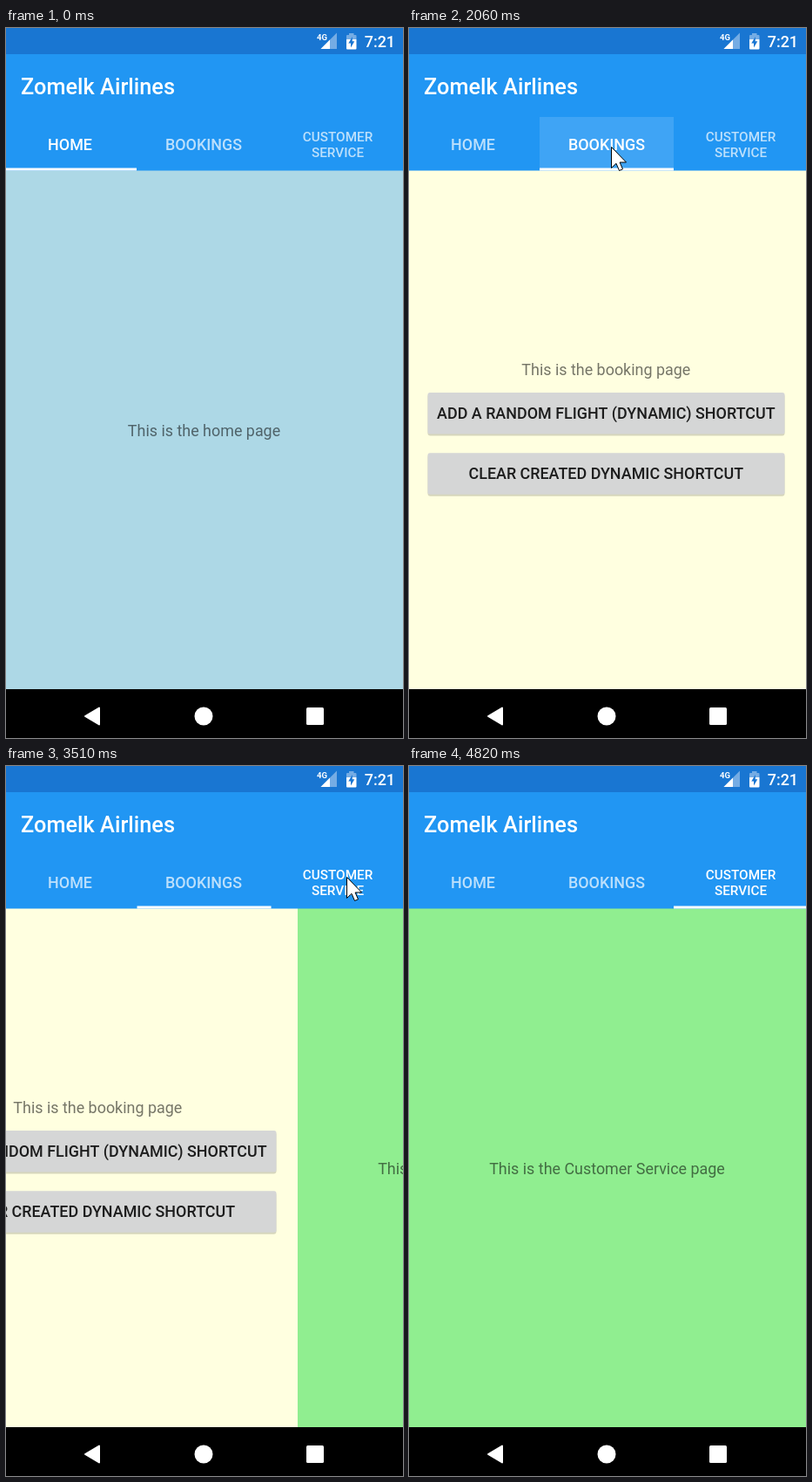
These frames come from a looping animation (456x814 px, 5.28 s). An HTML page with a canvas:

```html
<!DOCTYPE html>
<html lang="en">
<head>
<meta charset="utf-8">
<title>Tab navigation</title>
<style>
html, body { margin: 0; width: 100%; height: 100%; overflow: hidden; background: #000; }
canvas { display: block; }
</style>
</head>
<body>
<canvas id="stage" width="456" height="814"></canvas>
<script>
const ctx = document.getElementById('stage').getContext('2d');
const WIDTH = 456, HEIGHT = 814, LOOP = 5280;
const BAR_BOTTOM = 163.5, NAV_TOP = 758;
const BODY = 17.92, SMALL = 15.3;
const INK = 'rgba(0,0,0,.54)';

const REFRESH = 47; // the screen is redrawn in steps of this many ms
const ENTER = 330;
const LEAD = 12;    // the page is already moving at the first redraw after a tap

const TABS = [
  { x: 0, w: 150, mid: 73.5, lines: ['HOME'] },
  { x: 150, w: 154, mid: 227, lines: ['BOOKINGS'] },
  { x: 304, w: 152, mid: 381, lines: ['CUSTOMER', 'SERVICE'] }
];
const TAPS = [
  { at: 1750, tab: 1, x: 232, y: 136 },
  { at: 3510, tab: 2, x: 391, y: 127 }
];

// Each glide of the pointer is one bend from where it rests to the next place.
const [BOOK, HELP] = TAPS;
const GLIDES = [
  { start: ENTER, end: 830, from: { x: 378, y: 739 }, bend: { x: 33, y: 193 }, to: { x: 208, y: 199 } },
  { start: 830, end: 1470, from: { x: 208, y: 199 }, bend: { x: 228, y: 145 }, to: BOOK },
  { start: 2250, end: 3140, from: BOOK, bend: { x: 217, y: 327 }, to: HELP },
  { start: 3800, end: 4775, from: HELP, bend: { x: 417, y: 260 }, to: { x: 391, y: HEIGHT } }
];

const clamp = v => Math.max(0, Math.min(1, v));
const mix = (a, b, k) => a + (b - a) * k;
const bendAt = (a, b, c, k) => mix(mix(a, b, k), mix(b, c, k), k);
const decelerate = k => 1 - (1 - clamp(k)) ** 5;

// cubic-bezier(.4, 0, .2, 1)
function standardEase(k) {
  k = clamp(k);
  let lo = 0, hi = 1;
  for (let i = 0; i < 20; i++) {
    const s = (lo + hi) / 2;
    const x = 1.2 * s * (1 - s) ** 2 + .6 * s * s * (1 - s) + s ** 3;
    if (x < k) lo = s; else hi = s;
  }
  return 3 * lo * lo - 2 * lo ** 3;
}

// Redraws are counted from the latest moment the user did something.
function snap(t) {
  const since = [0, ENTER, BOOK.at, HELP.at].filter(at => at <= t).pop();
  return since + Math.floor((t - since) / REFRESH) * REFRESH;
}

function rect(x, y, w, h, color, r = 0) {
  ctx.fillStyle = color;
  ctx.beginPath();
  ctx.roundRect(x, y, w, h, r);
  ctx.fill();
}

function poly(points, color) {
  ctx.fillStyle = color;
  ctx.beginPath();
  points.forEach(([x, y]) => ctx.lineTo(x, y));
  ctx.closePath();
  ctx.fill();
}

function circle(x, y, r, color) {
  ctx.fillStyle = color;
  ctx.beginPath();
  ctx.arc(x, y, r, 0, Math.PI * 2);
  ctx.fill();
}

function outline(color, width, join) {
  ctx.strokeStyle = color;
  ctx.lineWidth = width;
  ctx.lineJoin = join;
  ctx.stroke();
}

function text(str, x, y, size, color, weight = 400, align = 'center') {
  ctx.font = `${weight} ${size}px Roboto, sans-serif`;
  ctx.textAlign = align;
  ctx.fillStyle = color;
  ctx.fillText(str, x, y);
}

function button(label, y) {
  rect(21.5, y + 1.5, 410, 48, 'rgba(0,0,0,.16)', 3);
  rect(21.5, y, 410, 47.5, '#d5d6d6', 2.5);
  text(label, 226.3, y + 30, BODY, 'rgba(0,0,0,.87)', 500);
}

const PAGES = [
  { color: '#add8e6', draw: () => text('This is the home page', 227.5, 467.5, BODY, INK) },
  { color: '#ffffe0', draw() {
    text('This is the booking page', 226.3, 398, BODY, INK);
    button('ADD A RANDOM FLIGHT (DYNAMIC) SHORTCUT', 418);
    button('CLEAR CREATED DYNAMIC SHORTCUT', 487.3);
  } },
  { color: '#90ee90', draw: () => text('This is the Customer Service page', 227.5, 467.5, BODY, INK) }
];

function drawPages(scroll) {
  PAGES.forEach((page, i) => {
    const x = Math.round((i - scroll) * WIDTH);
    if (Math.abs(x) >= WIDTH) return;
    ctx.save();
    ctx.translate(x, 0);
    rect(0, 163, WIDTH, NAV_TOP - 163, page.color);
    page.draw();
    ctx.restore();
  });
}

function drawStatus() {
  const faint = 'rgba(255,255,255,.4)';
  rect(0, 0, WIDTH, 30, '#1976d2');
  text('4G', 357, 13.5, 9.5, '#fff', 700, 'left');
  poly([[361.5, 24], [380, 24], [380, 5.5]], faint);
  poly([[361.5, 24], [372, 24], [372, 13.5]], '#fff');
  rect(394, 6, 5.5, 2, faint);
  rect(391, 8, 11.5, 5, faint, [1, 1, 0, 0]);
  rect(391, 13, 11.5, 11.5, '#fff', [0, 0, 1, 1]);
  poly([[397.8, 10], [393.3, 17.5], [396, 17.5], [396, 22.5], [400.3, 15.2], [397.8, 15.2]], '#1976d2');
  text('7:21', 447, 22, BODY, '#fff', 500, 'right');
}

function drawRipple(t, tap) {
  const age = t - tap.at;
  const strength = Math.min(clamp(age / 90), clamp((580 - age) / 220));
  if (strength <= 0) return;
  const tab = TABS[tap.tab];
  ctx.save();
  ctx.beginPath();
  ctx.rect(tab.x, 102, tab.w, BAR_BOTTOM - 102);
  ctx.clip();
  circle(tap.x, tap.y, mix(20, 190, clamp(age / 240)), `rgba(255,255,255,${.135 * strength})`);
  ctx.restore();
}

function drawAppBar(t, selected) {
  rect(0, 30, WIDTH, BAR_BOTTOM - 30, '#2196f3');
  text('Zomelk Airlines', 17, 76, 25.33, '#fff', 500, 'left');
  TAPS.forEach(tap => drawRipple(t, tap));
  TABS.forEach(({ mid, lines }, i) => {
    const color = i === selected ? '#fff' : 'rgba(255,255,255,.7)';
    if (lines.length === 1) text(lines[0], mid, 139.5, BODY, color, 500);
    else lines.forEach((line, n) => text(line, mid, 130 + n * 18, SMALL, color, 500));
  });
  let { x, w } = TABS[0];
  for (const tap of TAPS) {
    if (t < tap.at) break;
    const k = standardEase((t - tap.at + LEAD) / 300), to = TABS[tap.tab];
    x = mix(x, to.x, k);
    w = mix(w, to.w, k);
  }
  rect(x, 160.5, w, 3, '#fff');
}

function drawNav() {
  rect(0, NAV_TOP, WIDTH, HEIGHT - NAV_TOP, '#000');
  poly([[91, 789], [107, 779.5], [107, 798.5]], '#fff');
  outline('#fff', 2, 'round');
  circle(227, 789, 10.5, '#fff');
  rect(345, 779, 20, 20, '#fff', 1.5);
}

function drawPointer(t) {
  const glide = GLIDES.filter(g => g.start <= t).pop();
  if (!glide || t >= GLIDES.at(-1).end) return;
  const { start, end, from, bend, to } = glide;
  const k = clamp((t - start) / (end - start));
  const [x, y] = ['x', 'y'].map(axis => Math.round(bendAt(from[axis], bend[axis], to[axis], k)));
  ctx.save();
  ctx.translate(x + .5, y + .5);
  poly([[0, 0], [0, 24], [5.5, 18.8], [9, 27], [13, 25.3], [9.6, 17.5], [17, 17.5]], '#fff');
  outline('#000', 1, 'miter');
  ctx.restore();
}

function render(now) {
  const t = snap(now % LOOP);
  const begun = TAPS.filter(tap => t >= tap.at);
  const scroll = begun.reduce((sum, tap) => sum + decelerate((t - tap.at + LEAD) / 200), 0);
  drawPages(scroll);
  drawAppBar(t, begun.length);
  drawStatus();
  drawNav();
  drawPointer(t);
}

const origin = performance.now();
function tick() {
  render(performance.now() - origin);
  requestAnimationFrame(tick);
}
tick();
</script>
</body>
</html>
```
